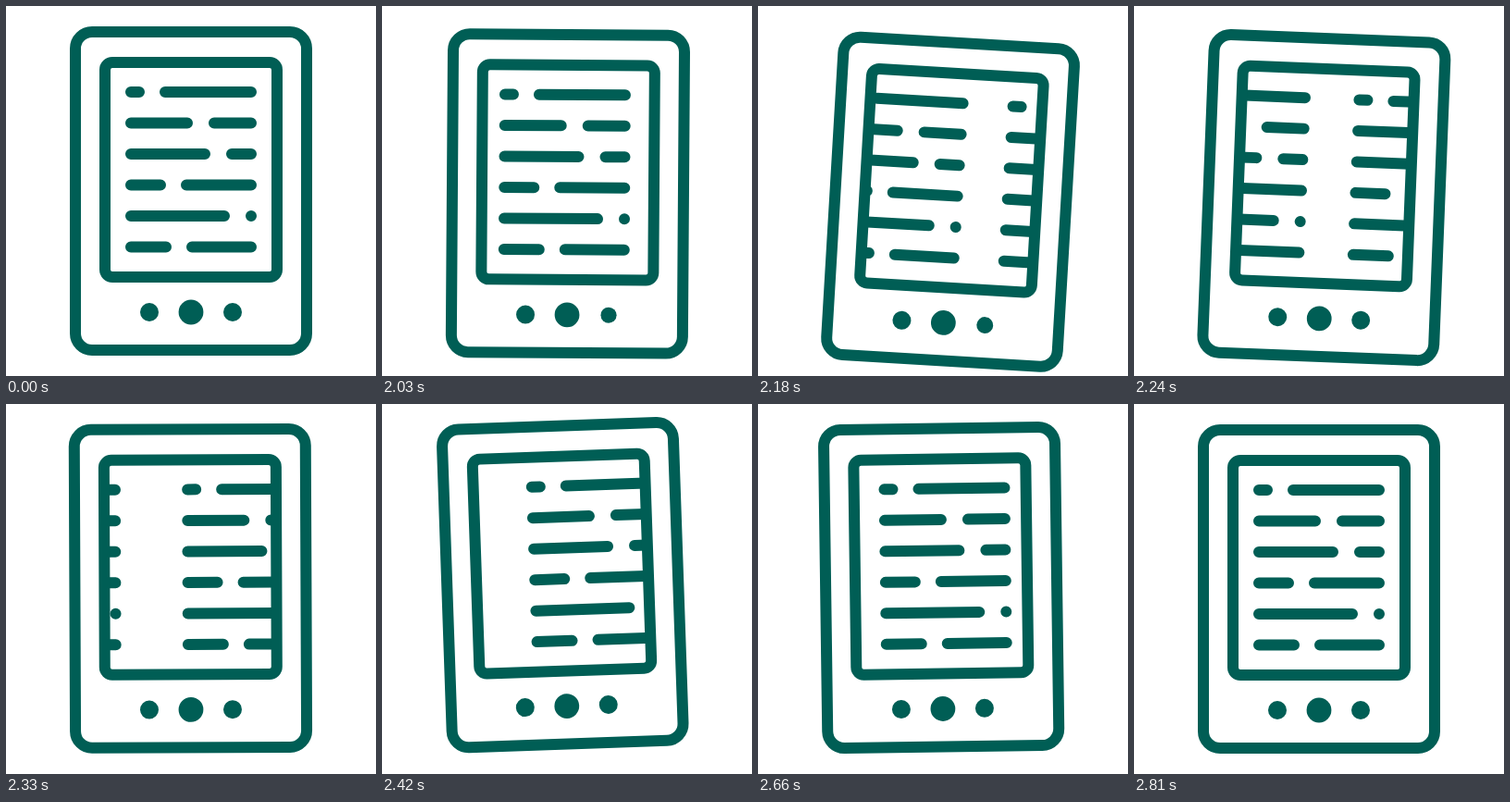
These frames come from a looping animation (400x400 px, 2840 ms). An HTML page:

```html
<!DOCTYPE html>
<html lang="en">
<head>
<meta charset="utf-8">
<title>E-reader page turn</title>
<style>
  html, body { margin: 0; height: 100%; overflow: hidden; background: #fff; }
  svg { display: block; width: 100%; height: 100%; }
  .line { fill: none; stroke: #005e55; stroke-width: 12; stroke-linecap: round; }
  .dot { fill: #005e55; }
</style>
</head>
<body>
<svg viewBox="0 0 400 400">
  <clipPath id="screen"><rect x="107" y="61" width="186" height="232"/></clipPath>
  <g id="device">
    <g clip-path="url(#screen)">
      <path class="line" id="oldPage"/>
      <path class="line" id="newPage"/>
    </g>
    <rect class="line" x="75" y="28" width="250" height="344" rx="18"/>
    <rect class="line" x="107" y="61" width="186" height="232" rx="8"/>
    <circle class="dot" cx="155" cy="331" r="10"/>
    <circle class="dot" cx="200" cy="331" r="13.4"/>
    <circle class="dot" id="button" cx="245" cy="331" r="10"/>
  </g>
</svg>
<script>
const LOOP = 2840, REST = 2000, TURN = 810, STEP = 30;
const $ = id => document.getElementById(id);

// Each row spans x 135 to 265, with one gap between two words.
const gaps = [[144, 172], [196, 225], [215, 244], [167, 195], [236, 265], [173, 201]];
const text = gaps.map(([a, b], i) => {
  const y = 93 + i * 33.5;
  return `M135 ${y}H${a}M${b} ${y}H265.01`;
}).join('');
$('oldPage').setAttribute('d', text);
$('newPage').setAttribute('d', text);

// Sine ease from one [time, value] extreme to the next.
function swing(t, ...points) {
  let [t0, value] = points[0];
  for (const [t1, next] of points.slice(1)) {
    const u = Math.min(1, Math.max(0, (t - t0) / (t1 - t0)));
    value += (next - value) * (1 - Math.cos(Math.PI * u)) / 2;
    if (u < 1) break;
    t0 = t1;
  }
  return value;
}

function draw(now) {
  const moving = Math.max(0, now % LOOP - REST);
  const t = Math.floor(moving / STEP) * STEP % TURN;

  const drop = swing(t, [0, 0], [100, 14], [430, -4.5], [TURN, 0]);
  const tilt = swing(t, [0, 0], [140, 3.6], [450, -2.1], [TURN, 0]);
  const radius = swing(t, [0, 10], [70, 6.3], [240, 10]);
  const leave = -146 * (t / 330) ** 1.53;
  const enter = 184 * Math.exp(-((t / 315) ** 1.75));

  $('device').setAttribute('transform', `translate(0 ${drop}) rotate(${tilt} 200 337)`);
  $('button').setAttribute('r', radius);
  $('oldPage').setAttribute('transform', `translate(${leave})`);
  $('newPage').setAttribute('transform', `translate(${enter})`);
}

const begin = performance.now();
function loop() {
  draw(performance.now() - begin);
  requestAnimationFrame(loop);
}
loop();
</script>
</body>
</html>
```
